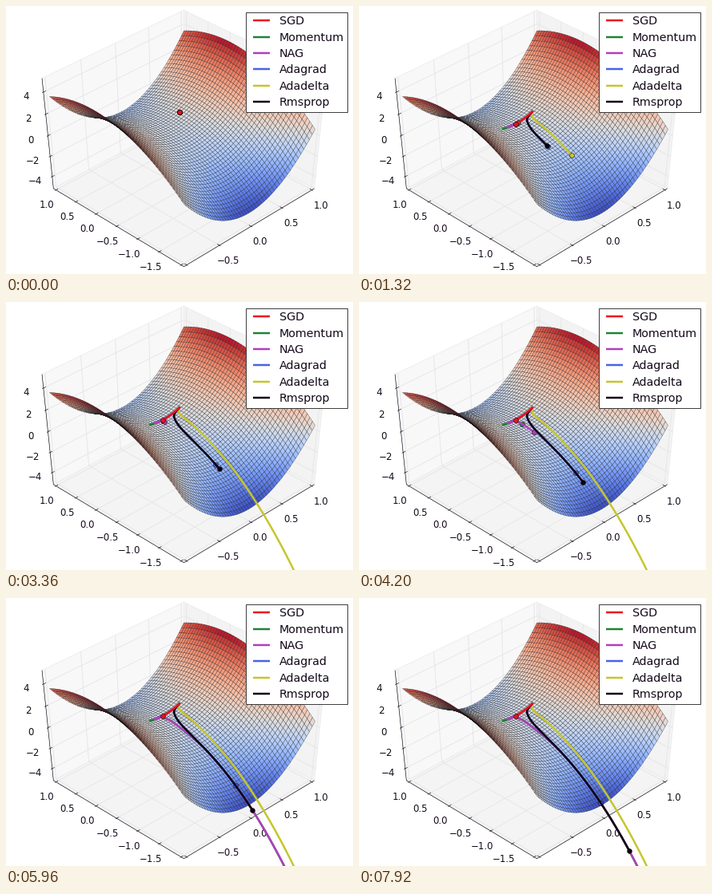
A matplotlib script for the animation above (7960 ms loop, 434 by 336 pixels).

```python
import numpy as np
import matplotlib.pyplot as plt
from matplotlib.animation import FuncAnimation
from matplotlib.collections import LineCollection, PolyCollection
from matplotlib.patches import Rectangle

W, H = 434, 336
FRAMES, STEP = 199, 40
PX = 0.72  # points per pixel at 100 dpi
SUB = 8    # trail samples per frame
A, B = 4.6, 1.0
DIST, ELEV = 8.5, np.radians(43.25)
INK = "#14081a"

plt.rcParams["font.family"] = "DejaVu Sans"
plt.rcParams["text.color"] = INK
fig = plt.figure(figsize=(W / 100, H / 100), dpi=100, facecolor="white")
ax = fig.add_axes([0, 0, 1, 1])
ax.set_xlim(0, W)
ax.set_ylim(H, 0)
ax.axis("off")


def saddle(x, y):
    return A * x**2 - B * y**2


def project(x, y, z):
    """Perspective view from azimuth -135, in pixels."""
    r, s, c = np.sqrt(0.5), np.sin(ELEV), np.cos(ELEV)
    xn, yn, zn = x / 2, (y + 0.5) / 3, z / 10
    u, near = (xn - yn) * r, -(xn + yn) * r
    v, depth = zn * c - near * s, DIST - near * c - zn * s
    return 222.5 + 1962 * u / depth, 162.6 - 1545 * v / depth


def path(*points):
    return [project(*p) for p in points]


# Panes, grid and axes
X0, X1 = -1 - 2 / 48, 1 + 2 / 48
Y0, Y1 = -2 - 3 / 48, 1 + 3 / 48
Z0, Z1 = -5 - 10 / 48, 5 + 10 / 48
x_ticks = np.arange(-1, 1.1, 0.5)
y_ticks = np.arange(-2, 1.1, 0.5)
z_ticks = np.arange(-4, 5, 2)

panes = [
    path((X0, Y1, Z0), (X1, Y1, Z0), (X1, Y1, Z1), (X0, Y1, Z1)),
    path((X1, Y0, Z0), (X1, Y1, Z0), (X1, Y1, Z1), (X1, Y0, Z1)),
    path((X0, Y0, Z0), (X1, Y0, Z0), (X1, Y1, Z0), (X0, Y1, Z0)),
]
ax.add_collection(PolyCollection(
    panes, facecolors=["#f8f8f8", "#f3f3f3", "#f4f4f4"],
    edgecolors="#ececec", linewidths=0.8 * PX, zorder=1))

grid = [path((t, Y0, Z0), (t, Y1, Z0), (t, Y1, Z1)) for t in x_ticks]
grid += [path((X0, t, Z0), (X1, t, Z0), (X1, t, Z1)) for t in y_ticks]
grid += [path((X0, Y1, t), (X1, Y1, t), (X1, Y0, t)) for t in z_ticks]
ax.add_collection(LineCollection(grid, colors="#e6e6e6",
                                 linewidths=0.9 * PX, zorder=2))

axes = [path((X0, Y1, Z1), (X0, Y1, Z0), (X0, Y0, Z0), (X1, Y0, Z0))]
axes += [path((t, Y0 - 0.025, Z0), (t, Y0 + 0.05, Z0)) for t in x_ticks]
axes += [path((X0 - 0.017, t, Z0), (X0 + 0.033, t, Z0)) for t in y_ticks]
axes += [path((X0 - 0.017, Y1, t), (X0 + 0.033, Y1, t)) for t in z_ticks]
ax.add_collection(LineCollection(axes, colors=INK,
                                 linewidths=0.65 * PX, zorder=3))


def tick_label(point, dx, dy, text):
    x, y = project(*point)
    ax.text(x + dx, y + dy, text.replace("-", "\u2212"), fontsize=11.7 * PX,
            ha="center", va="center", zorder=3)


for t in x_ticks:
    tick_label((t, Y0, Z0), 11, 19.5, f"{t:.1f}")
for t in y_ticks:
    tick_label((X0, t, Z0), -11, 19, f"{t:.1f}")
for t in z_ticks:
    tick_label((X0, Y1, t), -21.5, 5.5, f"{t:d}")

# Surface, painted from far to near
N = 50
gx, gy = np.meshgrid(np.linspace(-1, 1, N + 1), np.linspace(-2, 1, N + 1))
mesh = np.stack(project(gx, gy, saddle(gx, gy)), axis=-1)
quads = np.stack([mesh[:-1, :-1], mesh[:-1, 1:], mesh[1:, 1:], mesh[1:, :-1]],
                 axis=2).reshape(-1, 4, 2)
cx = (gx[:-1, :-1] + 1 / N).ravel()
cy = (gy[:-1, :-1] + 1.5 / N).ravel()
order = np.argsort(-(cx / 2 + cy / 3), kind="stable")
tone = (saddle(cx, cy) + 4 * B) / (A + 4 * B)
ax.add_collection(PolyCollection(
    quads[order], facecolors=plt.cm.coolwarm(tone[order]),
    edgecolors="#101018", linewidths=0.27 * PX, zorder=4))

# Optimizer tracks: x and y as functions of the step count
n = np.arange((FRAMES - 1) * SUB + 1) / SUB
START = 0.26


def swing(decay, speed):
    return START * np.exp(-decay * n) * np.cos(speed * n)


def escape(y_ref):
    return -y_ref * np.exp(0.102 * (n - 105))


def slide(y, rate):
    return 0.17 * np.exp(rate * y) + 0.09 * np.exp(60 * y)


y_adagrad = -0.1074 * n**0.55
y_rms = -(0.0118 * n + 0.32 * (1 - np.exp(-(n / 9) ** 1.5)))
y_delta = np.maximum(-0.257 * (np.exp(0.05 * n) - 1), -3.4)
x_delta = 0.1 + 0.1 * np.exp(0.7 * y_delta) + 0.06 * np.exp(20 * y_delta)

# name, colour, stacking, x, y
methods = [
    ("SGD", "#ee1020", 11, START * np.exp(-n / 10), 0 * n),
    ("Momentum", "#1f8433", 6, swing(0.035, 0.35), escape(0.16)),
    ("NAG", "#b43cc0", 7, swing(0.09, 0.35), escape(0.44)),
    ("Adagrad", "#4a62ea", 8, slide(y_adagrad, 3.7), y_adagrad),
    ("Adadelta", "#c6c62c", 9, x_delta, y_delta),
    ("Rmsprop", "#0c000f", 10, slide(y_rms, 3.6), y_rms),
]

tracks = []
for name, color, z, x, y in methods:
    y = np.maximum(y, -3.4)
    px, py = project(x, y, saddle(x, y))
    line, = ax.plot([], [], color=color, lw=2.5 * PX, zorder=z)
    dot, = ax.plot([], [], "o", color=color, ms=5.8 * PX, mec="black",
                   mew=0.5 * PX, zorder=z + 0.5)
    tracks.append((px, py, line, dot))

# Legend
ax.add_patch(Rectangle((299.5, 7.5), 127, 125, facecolor="white",
                       edgecolor="#2a2a2a", lw=0.9 * PX, zorder=20))
for i, (name, color, *_) in enumerate(methods):
    row = 18.2 + 20.4 * i
    ax.plot([308.5, 329.5], [row, row], color=color, lw=2.5 * PX,
            solid_capstyle="butt", zorder=21)
    ax.text(342, row + 5, name, fontsize=14.3 * PX, va="baseline", zorder=21)


def update(frame):
    end = frame * SUB
    for px, py, line, dot in tracks:
        line.set_data(px[:end + 1], py[:end + 1])
        dot.set_data([px[end]], [py[end]])
    return [artist for track in tracks for artist in track[2:]]


anim = FuncAnimation(fig, update, frames=FRAMES, interval=STEP,
                     repeat=True, repeat_delay=0, blit=False)
plt.show()
```
